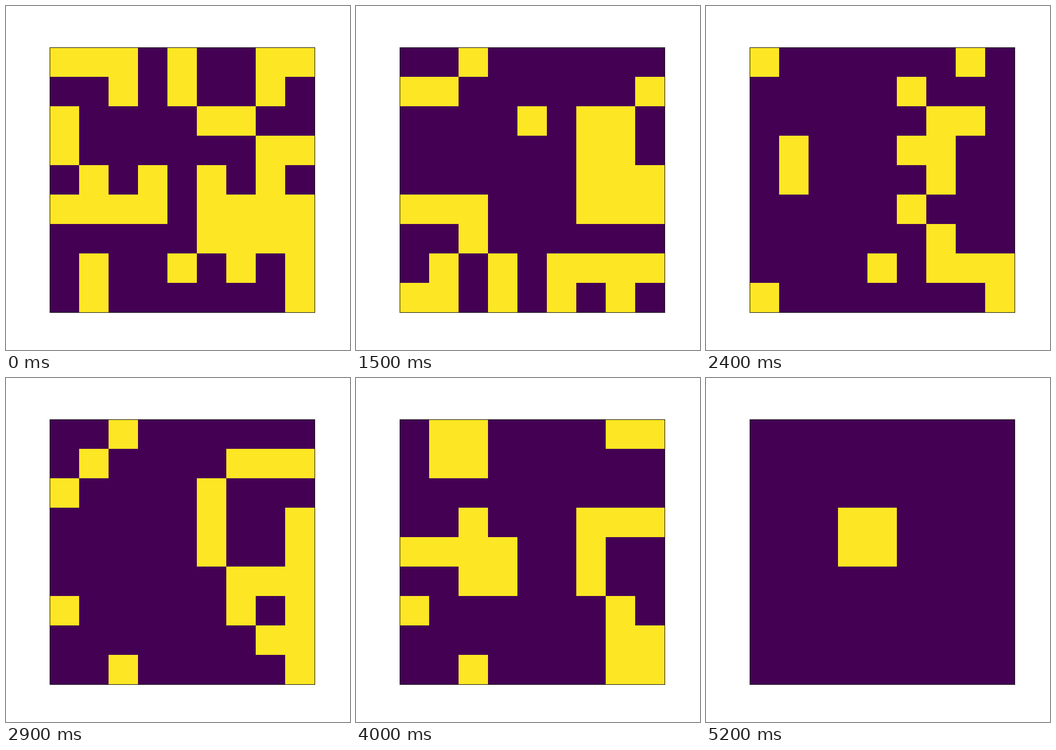
Write a matplotlib script that moves like this. It is 748 px wide and 748 px high and loops after 5300 ms.

```python
import numpy as np
import matplotlib.pyplot as plt
from matplotlib.animation import FuncAnimation

SIZE = 748
DPI = 100
STEP_MS = 100
HOLD = 2          # extra frames spent on the starting board
GENERATIONS = 50

START = """
111010011
001010010
100001100
100000011
010101010
111101111
000001111
010010101
010000001
"""


def parse(text):
    return np.array([[int(ch) for ch in row] for row in text.split()])


def evolve(board):
    """One Game of Life step on a board whose edges wrap around."""
    shifts = [(dy, dx) for dy in (-1, 0, 1) for dx in (-1, 0, 1) if dy or dx]
    near = sum(np.roll(board, s, axis=(0, 1)) for s in shifts)
    return ((near == 3) | ((board == 1) & (near == 2))).astype(int)


boards = [parse(START)]
for _ in range(GENERATIONS):
    boards.append(evolve(boards[-1]))

fig, ax = plt.subplots(figsize=(SIZE / DPI, SIZE / DPI), dpi=DPI)
ax.set_xticks([])
ax.set_yticks([])
image = ax.imshow(boards[0], cmap="viridis", vmin=0, vmax=1,
                  interpolation="nearest")


def draw(frame):
    image.set_data(boards[max(0, frame - HOLD)])
    return [image]


anim = FuncAnimation(fig, draw, frames=GENERATIONS + HOLD + 1,
                     interval=STEP_MS, repeat=True, repeat_delay=0)
plt.show()
```
